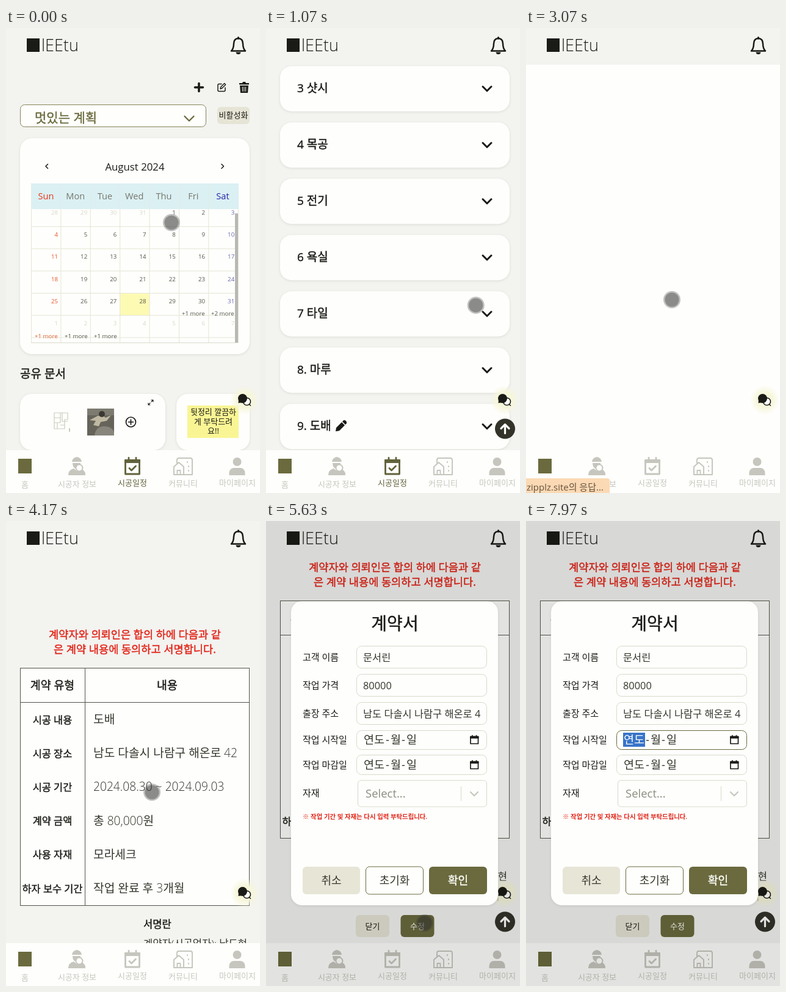
Recreate the animation shown at these times as an HTML page. Size 416 px wide and 760 px high, loop 8 s.

```html
<!DOCTYPE html>
<html lang="ko">
<head>
<meta charset="utf-8">
<title>시공일정</title>
<style>
html, body { margin: 0; width: 100%; height: 100%; overflow: hidden; background: #f3f3f0; }
svg { display: block; width: 416px; height: 760px; }
text { font-family: "Open Sans", "Noto Sans CJK KR", "Noto Sans CJK", sans-serif; white-space: pre; }
.card { filter: drop-shadow(0 1px 2px rgba(100, 100, 90, .16)); }
</style>
</head>
<body>
<svg id="stage" viewBox="0 0 416 760"></svg>
<script>
const LOOP = 8000;
const BG = '#f3f3f0', WHITE = '#fefefc', INK = '#1a1a16', BODY = '#36362e';
const OLIVE = '#6a6a3e', PALE = '#c6c6be', LINE = '#d9d9cc', GRID = '#e5e5d6', RED = '#e22418';

const rect = (x, y, w, h, r, fill, stroke = 'none', extra = '') =>
  `<rect x="${x}" y="${y}" width="${w}" height="${h}" rx="${r}" fill="${fill}" stroke="${stroke}" ${extra}/>`;
const circle = (x, y, r, fill, stroke = 'none', width = 1) =>
  `<circle cx="${x}" cy="${y}" r="${r}" fill="${fill}" stroke="${stroke}" stroke-width="${width}"/>`;
const line = (d, stroke = INK, width = 1, fill = 'none') =>
  `<path d="${d}" stroke="${stroke}" stroke-width="${width}" fill="${fill}" stroke-linecap="round" stroke-linejoin="round"/>`;
const shape = (d, fill) => `<path d="${d}" fill="${fill}"/>`;
// A thin outline stands in for the medium weight that Hangul lacks.
const text = (s, x, y, size, fill = INK, weight = 400, anchor = 'start') =>
  `<text x="${x}" y="${y}" font-size="${size}" fill="${fill}" font-weight="${weight}" text-anchor="${anchor}"` +
  `${weight === 500 ? ` stroke="${fill}" stroke-width=".4"` : ''}>${s}</text>`;
const mid = (s, x, y, size, fill, weight) => text(s, x, y, size, fill, weight, 'middle');
const end = (s, x, y, size, fill, weight) => text(s, x, y, size, fill, weight, 'end');
const group = (id, body) => `<g id="${id}">${body}</g>`;
const card = (x, y, w, h, r = 19) => rect(x, y, w, h, r, WHITE, 'none', 'class="card"');
const chevron = (x, y, size, color, width, up) =>
  line(`M${x - size} ${y + (up ? size : -size) / 2}l${size} ${up ? -size : size} ${size} ${up ? size : -size}`, color, width);

function toolbar() {
  return line('M309.5 97h13M316 90.5v13', INK, 3.6) +
    line('M353 91.5h-4a2 2 0 0 0-2 2v8a2 2 0 0 0 2 2h8a2 2 0 0 0 2-2v-4', INK, 1.5) +
    line('M351 99.5l.7-3 6-6 2 2-6 6z', INK, 1.4) +
    shape('M382 90h5l1-2h4l1 2h5v2.4h-16zM383 94h14l-1 12h-12z', INK) +
    line('M387.4 96.5v7M390 96.5v7M392.6 96.5v7', BG, 1) +
    rect(23.5, 125.5, 304, 36, 7, WHITE, '#85855a') +
    text('멋있는 계획', 47, 154, 21, OLIVE, 500) +
    chevron(300, 148, 7.5, OLIVE, 2.3) +
    rect(346, 129, 53, 28, 6, '#e6e4d4') + mid('비활성화', 372.5, 147.5, 13);
}

function calendar() {
  const step = 48.4, left = 41.5;
  const days = ['Sun', 'Mon', 'Tue', 'Wed', 'Thu', 'Fri', 'Sat'];
  const dayColor = i => i === 0 ? '#e8542c' : i === 6 ? '#6a66b0' : '#55554a';
  let out = card(23, 180, 376, 353, 20) + mid('August 2024', 211, 233, 16.8) +
    line('M68.5 222.5l-3.5 3.5 3.5 3.5M353 222.5l3.5 3.5-3.5 3.5', INK, 1.5) +
    rect(186.7, 434, step, 36, 0, '#fdfab4');
  for (let row = 0; row < 6; row++) {
    out += line(`M41.5 ${324.5 + 36.3 * row}H375`, GRID);
    for (let col = 0; col < 7; col++) {
      const n = row * 7 + col - 3;
      const outside = n < 1 || n > 31;
      const label = n < 1 ? n + 31 : n > 31 ? n - 31 : n;
      out += end(label, 85 + 48.2 * col, 305 + 36.2 * row, 9.7, outside ? '#d8d8ca' : dayColor(col));
    }
  }
  for (let i = 0; i < 8; i++) out += line(`M${left + step * i} 296V514`, GRID);
  out += line('M41.5 514.5H380', LINE) + rect(41, 254, 340, 42, 0, '#dbf0f3');
  days.forEach((d, i) => {
    out += line(`M${left + step * i} 254V296`, '#e3ece6') +
      mid(d, 65.5 + 48.25 * i, 280.5, 14.6, i === 0 ? '#e83418' : i === 6 ? '#2624a8' : '#77776c');
  });
  [[288, 470, '+1 more'], [336, 470, '+2 more'], [47, 507, '+1 more', '#e0602c'], [96, 507, '+1 more'], [144, 507, '+1 more']]
    .forEach(([x, y, s, c = '#55554a']) => out += text(s, x, y, 9.7, c));
  return out + rect(375, 303, 5, 211, 0, '#b8b8b4');
}

const expandIcon = x =>
  line(`M${x + 1} 611l3-3m-3 0h3v3M${x - 1} 613l-3 3m3 0h-3v-3`, INK, 1.1);

function documents() {
  return text('공유 문서', 23, 572, 19, INK, 500) +
    card(23, 598, 238, 92) + card(279, 598, 120, 92) +
    line('M79 629h22v11h-5v15H79zM79 637h10v-8M89 637v8h-10M92 629v14h9M84 645v10M89 649h7', '#cbcbbe', 1.2) +
    line('M104 655v4', PALE, 2) +
    rect(133, 622, 44, 44, 0, '#66645a') + rect(133, 622, 44, 11, 0, '#7d7b70') +
    shape('M145 666q2-14 14-15 15-1 18 10v5z', '#88867c') +
    shape('M137 641l13-7q9-2 13 3l9-4-7 9-10 2-3 7-9-2 4-7z', '#bfb8a2') + circle(157, 631, 5, '#3a3832') +
    circle(204.5, 644, 8, 'none', INK, 1.7) + line('M200.5 644h8M204.5 640v8', INK, 1.7) +
    expandIcon(237) + expandIcon(387) +
    rect(297, 617, 84, 53, 0, '#faf594') +
    ['뒷정리 깔끔하', '게 부탁드려', '요!!'].map((s, i) => mid(s, 339.5, 632 + 15.7 * i, 13)).join('') +
    end('총 시공 가격 : 340,000원', 399, 727, 19, INK, 500);
}

function avatar(x, y) {
  return circle(x, y, 32, '#dfe2d0') +
    shape(`M${x - 30} ${y + 5}q10-5 17 6l4 12-10 4q-11-8-11-22z`, '#a77a4c') +
    circle(x + 2, y, 16, '#8b6944') + shape(`M${x - 11} ${y + 3}q13-7 26 0-3 12-13 12t-13-12z`, '#f2e6d0') +
    circle(x - 4, y + 2, 2.5, INK) + circle(x + 8, y + 2, 2.5, INK) + circle(x + 2, y + 8, 1.8, INK) +
    shape(`M${x - 17} ${y - 9}q2-18 19-18t19 18z`, '#f2ac3c') +
    shape(`M${x - 10} ${y + 16}h24l3 12q-15 7-30 0z`, '#d4843c');
}

function trades() {
  const labels = ['1 철거', '2 설비', '3 샷시', '4 목공', '5 전기', '6 욕실', '7 타일', '8. 마루', '9. 도배'];
  const top = i => 755 + 92 * i;
  const y = top(8);
  const detail = card(23, y, 376, 286) + line(`M23 ${y + 86.5}H399`, LINE) +
    avatar(74, y + 137) + mid('남도현', 74, y + 191, 13) + mid('나래솔빛 인테리어', 74, y + 215, 13) +
    text('기간 : 2024.08.30 ~ 2024.09.03', 125, y + 117, 13.3) +
    text('시공 비용 : 80000', 125, y + 137, 13.3) + text('메모', 125, y + 158, 13) +
    rect(125, y + 167, 255, 64, 15, WHITE, LINE) +
    rect(129, y + 236, 65, 32, 10, WHITE, OLIVE) + rect(211, y + 236, 66, 32, 10, WHITE, OLIVE) +
    mid('상담', 161.5, y + 257, 13) + mid('계약서', 244, y + 257, 13) + chevron(362, y + 37, 7, INK, 3, true);
  return labels.slice(0, 8).map((_, i) => card(23, top(i), 376, 74)).join('') +
    group('closed', card(23, y, 376, 74) + chevron(362, y + 37, 7, INK, 3)) + group('opened', detail) +
    labels.map((s, i) => text(s, 51, top(i) + 42.5, 19, INK, 500) +
      (i < 8 ? chevron(362, top(i) + 37, 7, INK, 3) : '')).join('') +
    shape(`M114 ${y + 45}l1-6 9-9 5 5-9 9zM125 ${y + 29}l2-2q2-1 4 1t1 4l-2 2z`, INK);
}

function contract() {
  const rows = [['시공 내용', '도배'], ['시공 장소', '남도 다솔시 나람구 해온로 42'], ['시공 기간', '2024.08.30 ~ 2024.09.03'],
    ['계약 금액', '총 80,000원'], ['사용 자재', '모라세크'], ['하자 보수 기간', '작업 완료 후 3개월']];
  return mid('계약자와 의뢰인은 합의 하에 다음과 같', 211, 82, 17.6, RED, 500) +
    mid('은 계약 내용에 동의하고 서명합니다.', 211, 106, 17.6, RED, 500) +
    rect(23.5, 130.5, 375, 388, 0, WHITE, '#55554c') + line('M23.5 186.5H398.5M129.5 130.5V518.5', '#55554c') +
    mid('계약 유형', 76, 164.5, 18.4, INK, 500) + mid('내용', 264, 164.5, 18.4, INK, 500) +
    rows.map(([k, v], i) => mid(k, 76, 220.5 + 55.2 * i, 16.4, INK, 500) + text(v, 143, 221 + 55.2 * i, 19.2, BODY, 300)).join('') +
    text('서명란', 225, 554.5, 16.6, INK, 500) +
    text('계약자(시공업자): 남도현', 225, 587, 16.6, BODY, 300) +
    text('의뢰인(고객):', 225, 619, 16.6, BODY, 300) + end('문서린', 398, 619, 16.6, BODY, 300) +
    rect(147, 644, 55, 36, 6, '#e5e3d4') + mid('닫기', 174.5, 666.5, 13) +
    rect(220.5, 644, 55, 36, 6, OLIVE) + mid('수정', 248, 666.5, 13, WHITE);
}

function header() {
  return rect(0, 0, 416, 60, 0, BG) + rect(34, 17, 21, 22, 0, INK) + text('lEEtu', 58, 38, 27, INK, 300) +
    line('M369 37.5h23q-4-4-4-12 0-8-7.5-8.5-7.5.5-7.5 8.5 0 8-4 12z', INK, 2.5) +
    line('M380.5 15.5v1.5', INK, 3) + shape('M376.5 39.5h8q-.5 3.5-4 3.5t-4-3.5z', INK);
}

function nav() {
  const label = (s, x, y, c = PALE) => mid(s, x, y, 13, c);
  const plan = c => line('M195.5 706.5h23v22.5h-23zM201 702.5v5M213 702.5v5', c, 2.8) +
    rect(194, 705, 26, 6, 1, c) + line('M202 719.5l3.5 3.5 7-7', c, 2.8) + label('시공일정', 207, 748, c);
  return rect(0, 690, 416, 70, 0, WHITE) + rect(20, 704, 22, 24, 0, OLIVE) + label('홈', 31, 751) +
    shape('M108 709q1-7 8-8 7 1 8 8zM109 711h13q1 9-6 9t-7-9zM102 731q0-9 9-11l5 4 5-4q9 2 9 11z', PALE) +
    circle(120, 719, 5.5, WHITE, PALE, 2) + line('M124 723l5 5', PALE, 2.4) + label('시공자 정보', 116.5, 750) +
    group('planOn', plan('#62623c')) + group('planOff', plan(PALE)) +
    line('M275 730v-13l8-7 8 7v13zM280.5 730v-7h5v7M280 711v-5q0-3 3-3h19q3 0 3 3v24h-14M297 709v1M299 716v1M299 723v1', PALE, 1.9) +
    label('커뮤니티', 290, 749) +
    circle(378.5, 709, 7, PALE) + shape('M365.5 731v-4q1-8 8-8h10q7 0 8 8v4z', PALE) + label('마이페이지', 379, 748);
}

function floating() {
  return '<circle cx="391" cy="608" r="24" fill="url(#glow)"/>' +
    circle(394.5, 610.5, 6, WHITE, INK, 1.6) + line('M398 615l2.5 2', INK, 1.6) +
    circle(387.5, 605.5, 7.5, INK) + shape('M381 607l-.5 6 6-1z', INK) +
    group('toTop', circle(391.5, 655, 16.5, '#33332a') + line('M391.5 662.5v-14M385 654.5l6.5-6.5 6.5 6.5', WHITE, 3.2));
}

function dialog() {
  const field = (y, h, id = '') => rect(148.5, y + .5, 213, h, 8, WHITE, LINE, id && `id="${id}"`);
  const labels = ['고객 이름', '작업 가격', '출장 주소', '작업 시작일', '작업 마감일', '자재'];
  const labelY = [227.5, 273.5, 319.5, 362.5, 403.5, 450];
  const values = ['문서린', '80000', '남도 다솔시 나람구 해온로 4'];
  const date = (y, id) => group(id, text('연도', 160, y, 18.5, 'currentColor')) +
    [['-', 196], ['월', 204], ['-', 222], ['일', 230]].map(([s, x]) => text(s, x, y, 18.5, BODY)).join('') +
    line(`M335 ${y - 11}h12.5v11.5h-12.5zM338 ${y - 13}v2M344.5 ${y - 13}v2`, INK, 1.7) +
    rect(334, y - 12, 14.5, 4, 1, INK);
  return rect(0, 0, 416, 760, 0, 'rgba(0,0,0,.11)') +
    rect(41, 131, 339, 497, 18, WHITE, 'none', 'class="card"') + mid('계약서', 211, 177.5, 28, INK, 500) +
    labels.map((s, i) => text(s, 60, labelY[i], 15)).join('') +
    values.map((s, i) => field(204 + 46 * i, 36) + text(s, 159, 228.5 + 46 * i, 16.4, BODY)).join('') +
    field(342, 31, 'startField') + field(382, 32) +
    rect(159, 346, 36, 23, 0, '#3874c8', 'none', 'id="selection"') + date(363.5, 'startYear') + date(404.5, 'endYear') +
    rect(150.5, 424, 211, 43, 5, WHITE, LINE) + text('Select...', 163, 452, 18.5, '#8c8c80') +
    line('M319.5 434V457', LINE) + chevron(341, 446, 6, PALE, 2.2) +
    text('※ 작업 기간 및 자재는 다시 입력 부탁드립니다.', 60, 487, 10.4, RED, 600) +
    rect(60, 565, 94, 45, 6, '#e7e5d6') + mid('취소', 107, 593.5, 18, BODY) +
    rect(163.5, 565, 94, 45, 6, WHITE, OLIVE) + mid('초기화', 210.5, 593.5, 18, BODY) +
    rect(267, 565, 95, 45, 6, OLIVE) + mid('확인', 314.5, 593.5, 18, WHITE, 500);
}

const stage = document.getElementById('stage');
stage.innerHTML = '<defs><radialGradient id="glow"><stop offset=".5" stop-color="#f6f6da"/><stop offset="1" stop-color="#f6f6da" stop-opacity="0"/></radialGradient></defs>' +
  rect(0, 0, 416, 760, 0, BG) +
  group('schedule', toolbar() + calendar() + documents() + trades()) +
  group('blank', rect(0, 60, 416, 630, 0, WHITE)) +
  group('contract', contract()) + header() + nav() + floating() +
  group('status', rect(-4, 736, 141, 28, 4, '#fbd9b4') + text('zipplz.site의 응답...', 1, 756, 15, '#66523c')) +
  group('dialog', dialog()) +
  group('pointer', circle(0, 0, 14, 'rgba(50,50,50,.3)') + circle(0, 0, 11.5, 'rgba(45,45,45,.36)'));

const $ = id => document.getElementById(id);
const show = (id, on) => $(id).setAttribute('display', on ? 'inline' : 'none');
const move = (id, x, y) => $(id).setAttribute('transform', `translate(${x} ${y})`);

// Each row is a time followed by its values.
const scheduleScroll = [[0, 0], [670, 503], [1390, 1041], [2150, 1041], [2650, 1298]];
const contractScroll = [[4200, 0], [4680, 110]];
const pointerPath = [[0, 271, 318], [670, 333, 405], [1600, 350, 491], [2150, 350, 491], [2750, 239, 444],
  [4150, 239, 444], [4730, 264, 277], [5300, 260, 657], [5900, 260, 657], [6800, 185, 357]];

// Cubic interpolation that keeps its speed through passing points and rests at turns and stops.
function at(track, t) {
  const next = track.findIndex(row => row[0] > t);
  if (next === 0) return track[0].slice(1);
  if (next < 0) return track[track.length - 1].slice(1);
  const a = track[next - 1], b = track[next], span = b[0] - a[0], p = (t - a[0]) / span;
  const slope = (i, k) => i < 1 || i >= track.length ? 0 : (track[i][k] - track[i - 1][k]) / (track[i][0] - track[i - 1][0]);
  const speed = (i, k) => {
    const before = slope(i, k), after = slope(i + 1, k);
    return before * after > 0 ? 2 * before * after / (before + after) : 0;
  };
  return a.slice(1).map((v, j) => {
    const k = j + 1;
    return v + (b[k] - v) * p * p * (3 - 2 * p) +
      span * p * (1 - p) * ((1 - p) * speed(next - 1, k) - p * speed(next, k));
  });
}

function render(t) {
  const onSchedule = t < 2950, onContract = t >= 3550, focused = t >= 7000;
  const [scroll] = at(onSchedule ? scheduleScroll : contractScroll, t);
  show('schedule', onSchedule);
  show('blank', !onSchedule && !onContract);
  show('contract', onContract);
  move('schedule', 0, -scroll);
  move('contract', 0, 110 - scroll);
  show('closed', t < 1780);
  show('opened', t >= 1780);
  show('planOn', onSchedule);
  show('planOff', !onSchedule);
  show('toTop', (onSchedule || onContract) && scroll > 60);
  show('status', t >= 3000 && t < 3500);
  show('dialog', t >= 5400);
  show('selection', focused);
  $('startYear').setAttribute('color', focused ? WHITE : BODY);
  $('endYear').setAttribute('color', BODY);
  $('startField').setAttribute('stroke', focused ? OLIVE : LINE);
  show('pointer', t < 7200);
  move('pointer', ...at(pointerPath, t));
}

const start = performance.now();
function tick() {
  render((performance.now() - start) % LOOP);
  requestAnimationFrame(tick);
}
tick();
</script>
</body>
</html>
```
